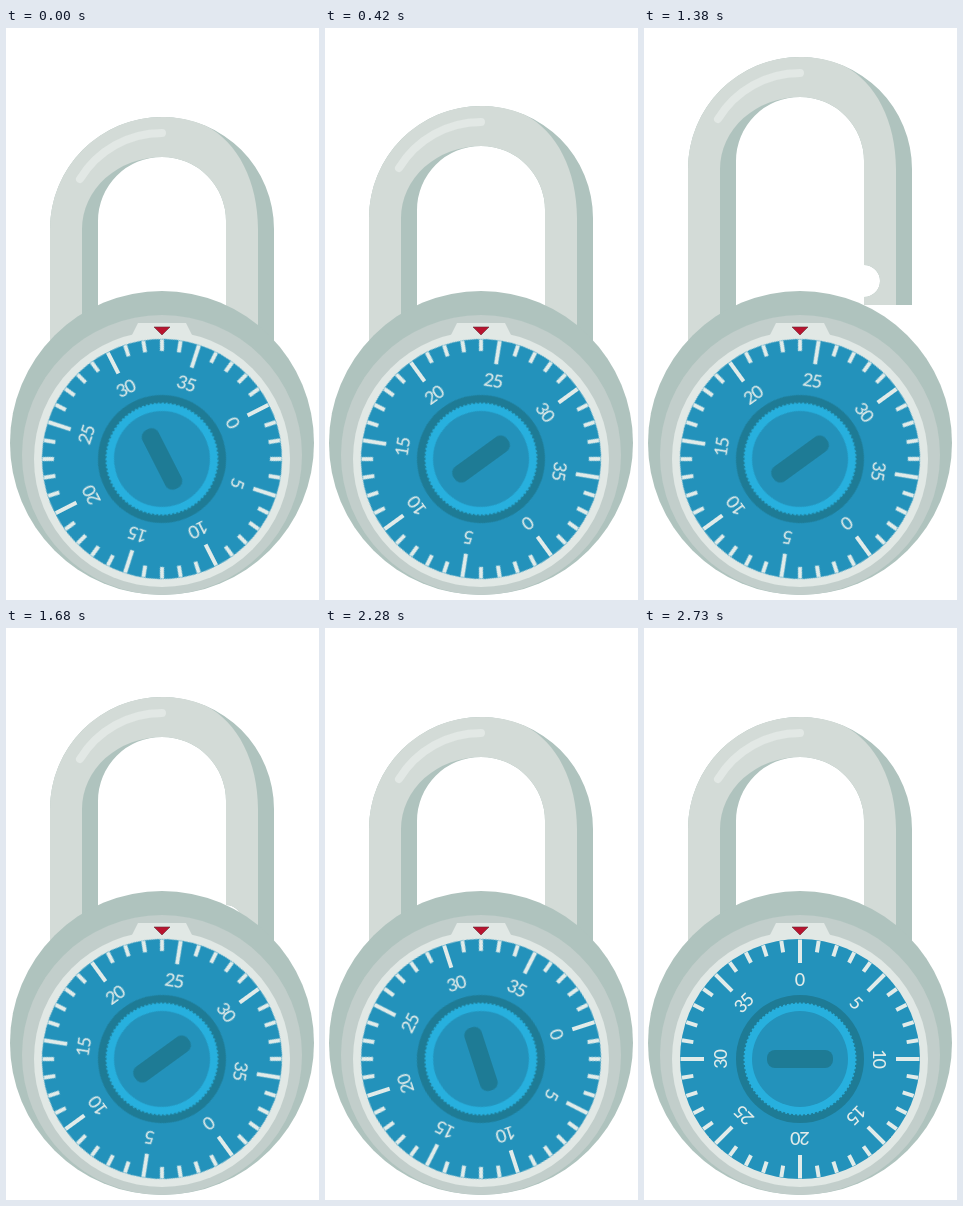
Recreate the animation shown at these times as an HTML page. Size 313x572 px, loop 3.03 s.

```html
<!DOCTYPE html>
<html lang="en">
<head>
<meta charset="utf-8">
<title>Combination lock</title>
<style>
  html, body { margin: 0; width: 100%; height: 100%; overflow: hidden; background: #fff; }
  svg { display: block; width: 313px; height: 572px; }

  .dark { fill: #afc3be; }
  .light { fill: #d3dbd7; }
  .pale { fill: #e1e8e5; }
  .blue { fill: #2392bb; }
  .teal { fill: #1e7b95; }

  .shine { fill: none; stroke: #e2e8e5; stroke-width: 8; stroke-linecap: round; }
  .teeth { fill: #27b0de; stroke: #27b0de; stroke-width: 2; stroke-dasharray: 2 2; }
  #marks line { stroke: #e1ebe9; stroke-width: 4; }
  #marks text {
    fill: #e1ebe9;
    font: 500 18px Lato, "Open Sans", sans-serif;
    letter-spacing: -1.2px;
    text-anchor: middle;
  }

  /* 101 ticks of 30 ms; the small lead keeps step edges off exact tick times */
  #shackle { animation: slide 3030ms -5ms infinite; }
  #dial { animation: turn 3030ms -5ms infinite; }

  @keyframes slide {
    0% { transform: translateY(0); animation-timing-function: step-end; }
    11.881% { transform: translateY(-3px); animation-timing-function: steps(19); }
    30.693% { transform: translateY(-79px); animation-timing-function: step-end; }
    31.683% { transform: translateY(-80px); animation-timing-function: step-end; }
    40.594% { transform: translateY(-80px); animation-timing-function: steps(20); }
    60.396%, 100% { transform: translateY(0); }
  }
  @keyframes turn {
    0% { transform: rotate(63deg); animation-timing-function: steps(11); }
    10.891% { transform: rotate(142.2deg); animation-timing-function: step-end; }
    11.881% { transform: rotate(144deg); animation-timing-function: step-end; }
    60.396% { transform: rotate(144deg); animation-timing-function: steps(30); }
    90.099%, 100% { transform: rotate(0deg); }
  }
</style>
</head>
<body>
<svg viewBox="0 0 313 572">
  <g id="shackle">
    <path class="dark" d="M44 440V201A112 112 0 0 1 268 201V337H220V329A16 16 0 0 0 220 297V193A64 64 0 0 0 92 193V440Z"/>
    <path class="light" d="M44 440V201A112 112 0 0 1 200 98C232 114 252 154 252 201V337H220V329A16 16 0 0 0 220 297V193A64 64 0 0 0 156 129A80 72 0 0 0 76 201V440Z"/>
    <path class="shine" d="M74 151A96 96 0 0 1 156 105"/>
  </g>

  <circle class="dark" cx="156" cy="415" r="152"/>
  <circle cx="156" cy="427" r="140" fill="#c2cecb"/>
  <circle class="pale" cx="156" cy="431" r="128"/>
  <path class="pale" d="M132 295H180L188 311H124Z"/>
  <path d="M148 299H164L156 307Z" fill="#b8142f" stroke="#6b2a38" stroke-width=".6"/>

  <g transform="translate(156 431)">
    <g id="dial">
      <circle class="blue" r="120"/>
      <g id="marks"></g>
      <circle class="teal" r="64"/>
      <circle class="teeth" r="55.5"/>
      <circle class="blue" r="48"/>
      <rect class="teal" x="-33" y="-9" width="66" height="18" rx="8"/>
    </g>
  </g>
</svg>
<script>
  const marks = document.getElementById('marks');

  function add(tag, attributes, text = '') {
    const node = document.createElementNS(marks.namespaceURI, tag);
    for (const key in attributes) node.setAttribute(key, attributes[key]);
    node.textContent = text;
    marks.append(node);
  }

  for (let i = 0; i < 40; i++) {
    const major = i % 5 === 0;
    const transform = `rotate(${i * 9})`;
    add('line', { y1: -119.5, y2: major ? -96 : -108, transform });
    if (major) add('text', { x: -0.6, y: -73, transform }, i);
  }
</script>
</body>
</html>
```
